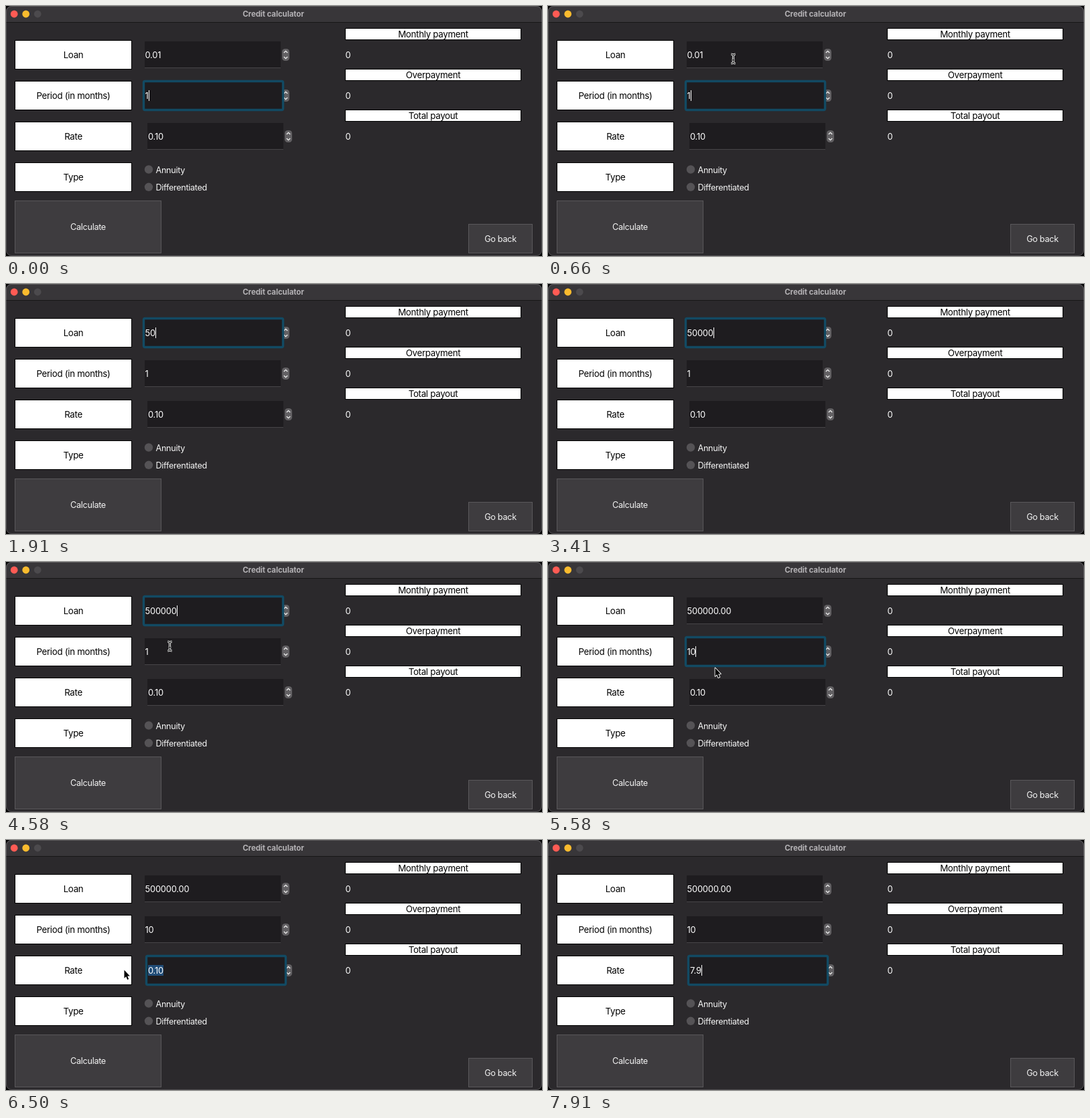
Recreate the animation shown at these times as an HTML page with a canvas. Size 800 px wide and 374 px high, loop 8 s.

```html
<!DOCTYPE html>
<html lang="en">
<head>
<meta charset="utf-8">
<title>Credit calculator</title>
<style>
html, body { margin: 0; width: 100%; height: 100%; overflow: hidden; background: #000; }
canvas { display: block; width: 800px; height: 374px; }
</style>
</head>
<body>
<canvas id="stage" width="800" height="374"></canvas>
<script>
const ctx = document.getElementById('stage').getContext('2d');
const LOOP = 8000, TICKS = 96, BLINK = 12;

const FACE = 'Inter, Roboto, sans-serif';
const STYLES = {
  title: { font: '700 11.5px ' + FACE, spacing: '-0.1px' },
  label: { font: '13.3px ' + FACE, spacing: '-0.3px' },
  plain: { font: '12.7px ' + FACE, spacing: '-0.33px' },
  value: { font: '12.9px ' + FACE, spacing: '-0.2px' }
};

const FIELDS = [
  { x: 207, y: 53, textX: 207.5 },
  { x: 207, y: 114, textX: 207.5 },
  { x: 211, y: 175, textX: 212 }
];
const FIELD_W = 203, FIELD_H = 39;

// Pointer runs as [tick, x, y]; the pointer is hidden between runs.
const RUNS = [
  [[1, 431, 314], [4, 345, 170], [8, 276.5, 79], [9, 244, 80], [10, 229, 81], [15, 181, 79], [17, 181, 79]],
  [[51, 183, 80], [53, 205, 100], [55, 244.5, 126], [57, 244, 131], [61, 244, 131]],
  [[65, 244, 132], [67, 249, 158], [70, 249, 197], [72, 239, 198], [78, 176, 194], [81, 176, 194]]
];
const DRAGS = [{ field: 0, from: 10, to: 18 }, { field: 2, from: 72, to: 82 }];
const FOCUS = [[0, 1], [10, 0], [57, 1], [72, 2]];
const LOAN_KEYS = [18, 22, 28, 33, 38, 42];
const RATE_KEYS = [82, 88, 91];
const CARET_RESETS = [-5, 10, ...LOAN_KEYS, 57, 62, 72, ...RATE_KEYS];

function typed(str, keys, before, n) {
  const count = keys.filter(k => k <= n).length;
  return count ? str.slice(0, count) : before;
}

function useStyle(name) {
  ctx.font = STYLES[name].font;
  ctx.letterSpacing = STYLES[name].spacing;
}

function text(str, x, y, style, color = '#fff', align = 'left') {
  useStyle(style);
  ctx.fillStyle = color;
  ctx.textAlign = align;
  ctx.textBaseline = 'alphabetic';
  ctx.fillText(str, x, y + 4.6);
}

function rect(x, y, w, h, color) {
  ctx.fillStyle = color;
  ctx.fillRect(x, y, w, h);
}

function disc(x, y, r, color) {
  ctx.fillStyle = color;
  ctx.beginPath();
  ctx.arc(x, y, r, 0, Math.PI * 2);
  ctx.fill();
}

function rounded(x, y, w, h, r) {
  ctx.beginPath();
  ctx.roundRect(x, y, w, h, r);
}

function line(points, color, width) {
  ctx.beginPath();
  points.forEach(([x, y]) => ctx.lineTo(x, y));
  ctx.strokeStyle = color;
  ctx.lineWidth = width;
  ctx.stroke();
}

function tag(str, x, y, w, h) {
  rect(x, y, w, h, '#000');
  rect(x + 1, y + 1, w - 2, h - 2, '#fff');
  text(str, x + w / 2, y + h / 2, 'label', '#000', 'center');
}

function button(str, x, y, w, h) {
  rect(x, y, w, h, '#5a585b');
  rect(x + 1, y + 1, w - 2, h - 2, '#3e3c3f');
  text(str, x + w / 2, y + h / 2, 'plain', '#f4f4f4', 'center');
}

function spinner(x, cy) {
  rounded(x, cy - 9, 11, 18, 4.5);
  ctx.fillStyle = '#626063';
  ctx.fill();
  for (const s of [-1, 1]) {
    const y = cy + s * 3;
    line([[x + 2.8, y], [x + 5.5, y + s * 2.7], [x + 8.2, y]], '#f0f0f0', 1.3);
  }
}

function drawWindow() {
  rect(0, 0, 800, 374, '#000');
  ctx.save();
  rounded(0, 0, 800, 374, 8);
  ctx.clip();
  rect(0, 0, 800, 374, '#2b292c');
  rect(0, 0, 800, 24, '#383639');
  rect(0, 24, 800, 1, '#171617');
  ctx.restore();
  rounded(0.5, 0.5, 799, 373, 8);
  ctx.strokeStyle = 'rgba(255,255,255,.17)';
  ctx.lineWidth = 1;
  ctx.stroke();
  ['#ff5b54', '#f9bb2e', '#4c4a4d'].forEach((c, i) => disc(12.2 + i * 17.5, 12, 5.4, c));
  text('Credit calculator', 399, 11.8, 'title', '#b3b1b4', 'center');
}

function drawForm() {
  ['Loan', 'Period (in months)', 'Rate', 'Type'].forEach((s, i) => tag(s, 13, 51 + Math.round(i * 61.1), 175, 44));
  ['Monthly payment', 'Overpayment', 'Total payout'].forEach((s, i) => {
    tag(s, 506, 33 + i * 61, 263, 18);
    text('0', 506.5, 73 + i * 61, 'value');
  });
  ['Annuity', 'Differentiated'].forEach((s, i) => {
    const y = 244.5 + i * 26.3;
    disc(213, y, 6.2, '#555356');
    text(s, 223.5, y + 0.6, 'plain', '#f4f4f4');
  });
  button('Calculate', 13, 291, 219, 79);
  button('Go back', 690, 326, 96, 44);
}

function pointerAt(n) {
  const run = RUNS.find(r => n >= r[0][0] && n <= r[r.length - 1][0]);
  if (!run) return null;
  const i = Math.max(1, run.findIndex(k => k[0] >= n));
  const [t0, x0, y0] = run[i - 1], [t1, x1, y1] = run[i];
  const p = (n - t0) / (t1 - t0);
  return { x: x0 + (x1 - x0) * p, y: y0 + (y1 - y0) * p };
}

function drawPointer({ x, y }) {
  const overField = FIELDS.some(f => x > f.x - 2 && x < f.x + FIELD_W && y > f.y && y < f.y + FIELD_H);
  ctx.save();
  ctx.translate(x, y);
  ctx.lineJoin = 'round';
  if (overField) {
    for (const [color, width] of [['#fff', 3], ['#111', 1.1]]) {
      line([[-3.2, -7], [-1.2, -6.6], [0, -5.2], [1.2, -6.6], [3.2, -7]], color, width);
      line([[-3.2, 7], [-1.2, 6.6], [0, 5.2], [1.2, 6.6], [3.2, 7]], color, width);
      line([[0, -5.4], [0, 5.4]], color, width);
      line([[-1.8, 1.8], [1.8, 1.8]], color, width);
    }
  } else {
    ctx.beginPath();
    [[0.5, 0.5], [0.5, 12.8], [3.2, 10.3], [5.2, 15], [7.2, 14.1], [5.2, 9.6], [8.8, 9.4]]
      .forEach(([px, py]) => ctx.lineTo(px, py));
    ctx.closePath();
    ctx.strokeStyle = '#fff';
    ctx.lineWidth = 1.8;
    ctx.stroke();
    ctx.fillStyle = '#000';
    ctx.fill();
  }
  ctx.restore();
}

function drawField(i, str, focused, n, pointer) {
  const f = FIELDS[i], cy = f.y + 20;
  rect(f.x, f.y, FIELD_W, FIELD_H, '#1e1c1f');
  rect(f.x, f.y + FIELD_H, FIELD_W, 1, '#474548');
  spinner(f.x + 205, cy);
  if (focused) {
    rounded(f.x - 1.5, f.y - 1.5, FIELD_W + 5, FIELD_H + 4, 2);
    ctx.fillStyle = '#1e1c1f';
    ctx.fill();
    ctx.strokeStyle = '#124a63';
    ctx.lineWidth = 3.4;
    ctx.stroke();
  }
  useStyle('value');
  const width = s => ctx.measureText(s).width;
  const end = f.textX + width(str);
  const drag = DRAGS.find(d => d.field === i && n >= d.from && n < d.to);
  let selected = false;
  if (drag && pointer) {
    let start = f.textX;
    for (let c = 1; c <= str.length; c++) {
      const left = f.textX + width(str.slice(0, c - 1)), right = f.textX + width(str.slice(0, c));
      if (pointer.x > (left + right) / 2) start = right;
    }
    selected = start < end;
    if (selected) rect(start, cy - 8, end - start, 16, '#214d78');
  }
  text(str, f.textX, cy, 'value');
  if (focused && !selected) {
    const last = Math.max(...CARET_RESETS.filter(k => k <= n));
    if ((n - last) % BLINK < BLINK / 2) rect(Math.round(end), cy - 8, 1, 16, '#fff');
  }
}

function draw(time) {
  const n = Math.floor((time % LOOP + 6.7) * TICKS / LOOP) % TICKS;
  const pointer = pointerAt(n);
  const focus = FOCUS.filter(([tick]) => tick <= n).pop()[1];
  const values = [
    n < 57 ? typed('500000', LOAN_KEYS, '0.01', n) : '500000.00',
    n < 62 ? '1' : '10',
    typed('7.9', RATE_KEYS, '0.10', n)
  ];
  drawWindow();
  drawForm();
  values.forEach((v, i) => drawField(i, v, i === focus, n, pointer));
  if (pointer) drawPointer(pointer);
}

const began = performance.now();
function loop() {
  draw(performance.now() - began);
  requestAnimationFrame(loop);
}
loop();
</script>
</body>
</html>
```
